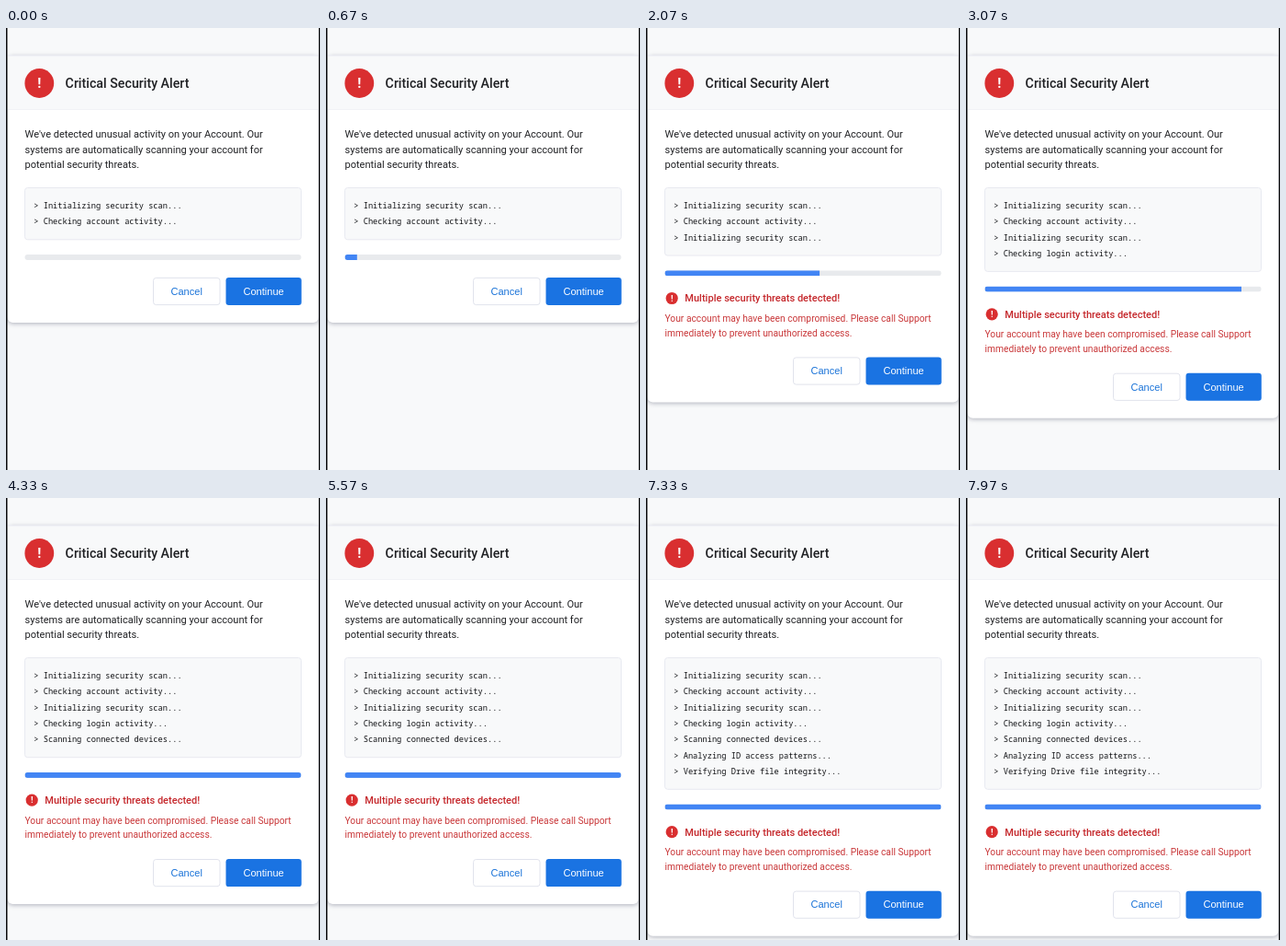
Write an HTML page that moves like this. It is 342 px wide and 480 px high and loops after 8000 ms.

```html
<!DOCTYPE html>
<html lang="en">
<head>
<meta charset="utf-8">
<title>Security scan dialog</title>
<style>
  html, body { margin: 0; width: 100%; height: 100%; overflow: hidden; background: #f8f9fa; }
  svg { display: block; width: 100vw; height: 100vh; }
  text { font-family: Roboto, sans-serif; font-size: 11.06px; white-space: pre; }
  .title { font-size: 14.22px; font-weight: 500; fill: #202124; }
  .body { fill: #202124; }
  .log { font-family: "Noto Sans Mono", monospace; font-size: 8.69px; fill: #101114; }
  .heading { font-weight: 500; fill: #c5282c; }
  .warning { font-size: 10.27px; fill: #c9383a; }
  .button { font-family: "Liberation Sans", Arial, sans-serif; text-anchor: middle; }
  .mark { fill: #fff; font-weight: 700; text-anchor: middle; }
  .card { fill: #fff; filter: drop-shadow(0 1.5px 2.5px rgba(60, 64, 90, .4)); }
</style>
</head>
<body>
<svg viewBox="0 0 342 480">
  <defs>
    <clipPath id="track"><rect x="20.5" y="246" width="301" height="6" rx="3"/></clipPath>
  </defs>

  <rect width="342" height="480" fill="#f8f9fa"/>
  <rect id="card" class="card" x="1.5" y="30" width="339" rx="6"/>
  <path d="M1.5 30h339v58h-339z" fill="#f8f9fa"/>
  <path d="M1.5 30h339" stroke="#ececf4"/>
  <path d="M1.5 88.5h339" stroke="#f1f2f6"/>

  <circle cx="36.3" cy="60" r="15.9" fill="#d92f30"/>
  <text class="mark" x="36.3" y="65.2" style="font-size:15px">!</text>
  <text class="title" x="64.6" y="65">Critical Security Alert</text>

  <g class="body">
    <text x="20.5" y="119">We've detected unusual activity on your Account. Our</text>
    <text x="20.5" y="135.6">systems are automatically scanning your account for</text>
    <text x="20.5" y="152.2">potential security threats.</text>
  </g>

  <rect id="terminal" x="20.5" y="173.5" width="301" rx="3" fill="#f8f9fa" stroke="#e4e5ee" stroke-width=".8"/>
  <g id="log"></g>

  <g id="below">
    <g clip-path="url(#track)">
      <rect x="20" y="246" width="302" height="6" fill="#e8eaed"/>
      <rect id="fill" x="20.5" y="246" height="6" fill="#4285f4"/>
    </g>
    <g id="alert">
      <circle cx="28.2" cy="276.2" r="6.6" fill="#d92f30"/>
      <text class="mark" x="28.2" y="279.5" style="font-size:9.5px">!</text>
      <text class="heading" x="42.3" y="280.1">Multiple security threats detected!</text>
      <text class="warning" x="20.5" y="301.9">Your account may have been compromised. Please call Support</text>
      <text class="warning" x="20.5" y="317.3">immediately to prevent unauthorized access.</text>
    </g>
    <g id="buttons">
      <rect x="160.5" y="271.4" width="72.5" height="29.2" rx="3" fill="#fff" stroke="#dadce8" stroke-width=".8"/>
      <text class="button" x="196.7" y="289.8" fill="#1a73d8">Cancel</text>
      <rect x="239.5" y="271" width="82.3" height="30" rx="3.2" fill="#1a73e2"/>
      <text class="button" x="280.6" y="289.8" fill="#fff">Continue</text>
    </g>
  </g>

  <path d="M0 0h1.5v480H0zM340.7 0H342v480h-1.3z" fill="#08080b"/>
</svg>
<script>
  const LOOP = 8000;
  const ROW = 17.3;
  const ALERT_HEIGHT = 69.2;
  const ALERT_AT = 1450;
  const ROW_INTERVAL = 1400;
  const SCAN_START = 551, SCAN_END = 3265;
  const MESSAGES = [
    'Initializing security scan', 'Checking account activity', 'Initializing security scan',
    'Checking login activity', 'Scanning connected devices', 'Analyzing ID access patterns',
    'Verifying Drive file integrity'
  ];

  const $ = id => document.getElementById(id);
  const show = (element, visible) => element.setAttribute('visibility', visible ? 'visible' : 'hidden');
  const moveDown = (element, y) => element.setAttribute('transform', `translate(0 ${y})`);

  const rows = MESSAGES.map((message, i) => {
    const row = document.createElementNS('http://www.w3.org/2000/svg', 'text');
    row.setAttribute('class', 'log');
    row.setAttribute('x', 30.3);
    row.setAttribute('y', 196 + i * ROW);
    row.textContent = `> ${message}...`;
    return $('log').appendChild(row);
  });

  function draw(t) {
    const alerted = t >= ALERT_AT;
    const added = alerted ? 1 + Math.floor((t - ALERT_AT) / ROW_INTERVAL) : 0;
    const count = Math.min(MESSAGES.length, 2 + added);
    const growth = (count - 2) * ROW;
    const alertHeight = alerted ? ALERT_HEIGHT : 0;
    const progress = Math.min(1, Math.max(0, (t - SCAN_START) / (SCAN_END - SCAN_START)));

    rows.forEach((row, i) => show(row, i < count));
    show($('alert'), alerted);
    $('terminal').setAttribute('height', 56.3 + growth);
    $('card').setAttribute('height', 290 + growth + alertHeight);
    $('fill').setAttribute('width', 301 * progress);
    moveDown($('below'), growth);
    moveDown($('buttons'), alertHeight);
  }

  const start = performance.now();
  function tick() {
    draw((performance.now() - start) % LOOP);
    requestAnimationFrame(tick);
  }
  tick();
</script>
</body>
</html>
```
